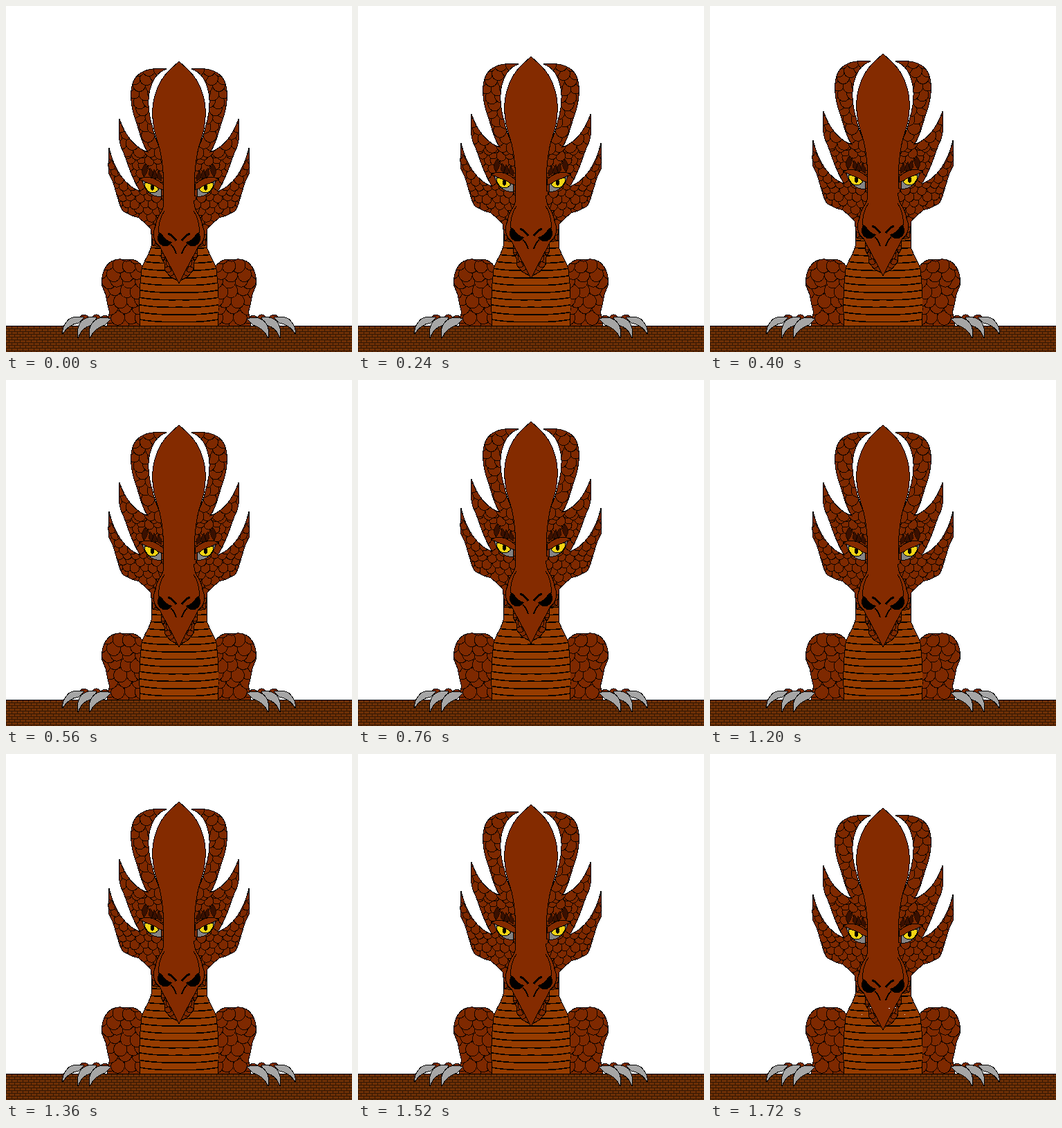
Write an HTML page that moves like this. It is 500x500 px and loops after 1760 ms.

```html
<!DOCTYPE html>
<html lang="en">
<head>
<meta charset="utf-8">
<title>Dragon on a wall</title>
<style>
  html, body { margin: 0; width: 100%; height: 100%; overflow: hidden; background: #fff; }
  svg { display: block; width: 100vw; height: 100vh; shape-rendering: crispEdges; }
  .skin { fill: #842b00; stroke: #000; }
  .hide { fill: #7e2900; }
  .line { fill: none; stroke: #000; }
  .belly { fill: #963c00; stroke: #000; }
  .brow { fill: #3a1000; stroke: #000; stroke-width: .6; }
  .claw { fill: #a6a6a6; stroke: #000; }
</style>
</head>
<body>
<svg viewBox="0 0 500 500">
  <defs>
    <pattern id="bricks" width="8" height="8" y="462" patternUnits="userSpaceOnUse">
      <path fill="#6e3006" d="M0 0H8V8H0Z"/>
      <path fill="#341703" d="M0 0H8V1H0ZM0 4H8V5H0ZM0 1H1V4H0ZM4 5H5V8H4Z"/>
    </pattern>
    <path id="side" d="M232 91C212 89 193 92 185 107C177 123 181 148 188 167C193 181 196 200 205 211
      C188 206 172 188 164 163C162 185 163 200 170 212C176 228 182 250 194 268
      C172 260 156 236 149 205C148 220 147 235 149 243C156 254 158 267 162 279C164 287 167 294 170 297
      L182 303L192 306L200 313L209 322L212 346L222 348H250V230L222 205
      C216 192 213 182 212 176C204 150 203 124 215 104C220 97 226 93 232 91Z"/>
    <path id="jaw" d="M220 344L224 350V363L229 372V381L237 391L250 398V348Z"/>
    <path id="arm" d="M198 377C193 371 189 367 181 366C170 368 165 364 157 367C145 371 139 384 138 400
      C139 409 144 412 145 422C147 430 147 436 150 442C147 449 146 455 146 462H196Z"/>
    <clipPath id="sideClip"><use href="#side"/></clipPath>
    <clipPath id="jawClip"><use href="#jaw"/></clipPath>
    <clipPath id="armClip"><use href="#arm"/></clipPath>
    <clipPath id="bellyClip"><path d="M250 285H210V347C208 358 198 369 196 381C193 405 192 435 194 462H250Z"/></clipPath>
  </defs>

  <path fill="url(#bricks)" d="M0 462H500V500H0Z"/>
  <path class="line" d="M0 462.5H500"/>

  <g id="body">
    <use href="#arm" class="hide"/>
    <g id="armScales" clip-path="url(#armClip)"></g>
    <use href="#arm" class="line"/>
    <path class="belly" d="M250 285H210V347C208 358 198 369 196 381C193 405 192 435 194 462H250"/>
    <g id="stripes" class="line" stroke-width="1.6" clip-path="url(#bellyClip)"></g>
    <path class="skin" d="M106 453C107 444 118 444 121 453ZM124 453C126 443 135 444 138 453ZM136 453C139 445 147 446 150 453Z"/>
    <path class="claw" d="M113 450C101 448 91 450 87 457C82 463 81 468 82 474C86 467 92 460 105 458Z"/>
    <path class="claw" d="M131 450C119 448 109 452 106 460C103 467 102 473 104 480C108 470 113 463 126 461Z"/>
    <path class="claw" d="M152 452C140 448 129 451 124 459C120 466 119 473 121 480C126 470 132 464 143 461Z"/>
  </g>
  <use href="#body" transform="matrix(-1 0 0 1 500 0)"/>

  <g id="head">
    <g id="half">
      <use href="#jaw" class="hide"/>
      <g id="jawScales" clip-path="url(#jawClip)"></g>
      <use href="#jaw" class="line"/>
      <use href="#side" class="hide"/>
      <g id="sideScales" clip-path="url(#sideClip)"></g>
      <use href="#side" class="line"/>
      <path class="brow" d="M201 228C206 235 205 240 200 246C194 241 196 235 201 228ZM208 234L213 240L211 248L206 244Z
        M214 236L218 243L216 250L211 246ZM220 238L225 246L224 253L218 248Z"/>
      <path class="skin" d="M193 250C204 244 218 249 227 258V266L196 253Z"/>
      <path fill="#858585" stroke="#000" d="M197 252L224 265V276C210 275 200 268 197 252Z"/>
      <path fill="#f4d414" stroke="#000" d="M200 255C208 256 215 259 221 264C219 269 215 270 210 270C204 268 200 262 200 255Z"/>
      <path d="M210 258L214 260C215 263 214 265 211 267C208 264 208 261 210 258Z"/>
      <path class="skin" d="M250 80L238 91C227 101 219 114 215 130C210 146 211 162 214 178C217 192 222 202 224 216
        C228 238 228 258 228 286C227 299 217 303 216 318C211 329 213 341 222 347C227 358 241 382 250 401"/>
      <path d="M221 327C217 335 219 344 227 347C233 348 238 346 240 341C234 340 228 335 225 329Z"/>
      <path class="line" stroke-width="3" d="M234 329C239 330 242 334 246 339"/>
      <path class="line" stroke-width="2" d="M238 345C242 347 244 352 246 358"/>
      <path class="line" d="M229 296C222 306 221 316 220 328"/>
    </g>
    <use href="#half" transform="matrix(-1 0 0 1 500 0)"/>
    <path id="glints" fill="#eee" d="M231 368h2v1h-2zM267 368h2v1h-2zM258 369h2v1h-2zM219 378h1v1h-1zM281 378h1v1h-1z"/>
  </g>
</svg>
<script>
const byId = id => document.getElementById(id);

let seed = 11;
const random = () => (seed = seed * 16807 % 2147483647) / 2147483647;
const jitter = amount => (random() - 0.5) * amount;

// Overlapping rounded scales, laid from the bottom row upwards.
function addScales(id, left, top, right, bottom, size) {
  let shapes = '', row = 0;
  for (let y = bottom; y > top - size; y -= size * 0.75, row++) {
    for (let x = left + row % 2 * size / 2; x < right + size; x += size) {
      const cx = x + jitter(size * 0.4), cy = y + jitter(size * 0.35);
      shapes += `<ellipse cx="${cx}" cy="${cy}" rx="${size * 0.58}" ry="${size * 0.62}"
        transform="rotate(${jitter(50)} ${cx} ${cy})"/>`;
    }
  }
  byId(id).innerHTML += `<g class="hide" stroke="#100400">${shapes}</g>`;
}

addScales('armScales', 138, 362, 196, 462, 17);
addScales('jawScales', 220, 345, 250, 398, 9);
addScales('sideScales', 146, 216, 230, 348, 12);
addScales('sideScales', 160, 90, 234, 210, 16);

let stripes = '';
for (let y = 304; y < 462; y += 10.6) stripes += `M190 ${y}Q214 ${y + 5} 250 ${y + 4}`;
byId('stripes').innerHTML = `<path d="${stripes}"/>`;

const STEP = 40, STEPS = 44;
function draw() {
  const step = Math.floor(performance.now() / STEP) % STEPS;
  const lift = step ? 23 - Math.abs(22 - step) : 0;
  byId('head').setAttribute('transform', `translate(0 ${-lift})`);
  byId('glints').style.display = step === STEPS - 1 ? '' : 'none';
  requestAnimationFrame(draw);
}
draw();
</script>
</body>
</html>
```
